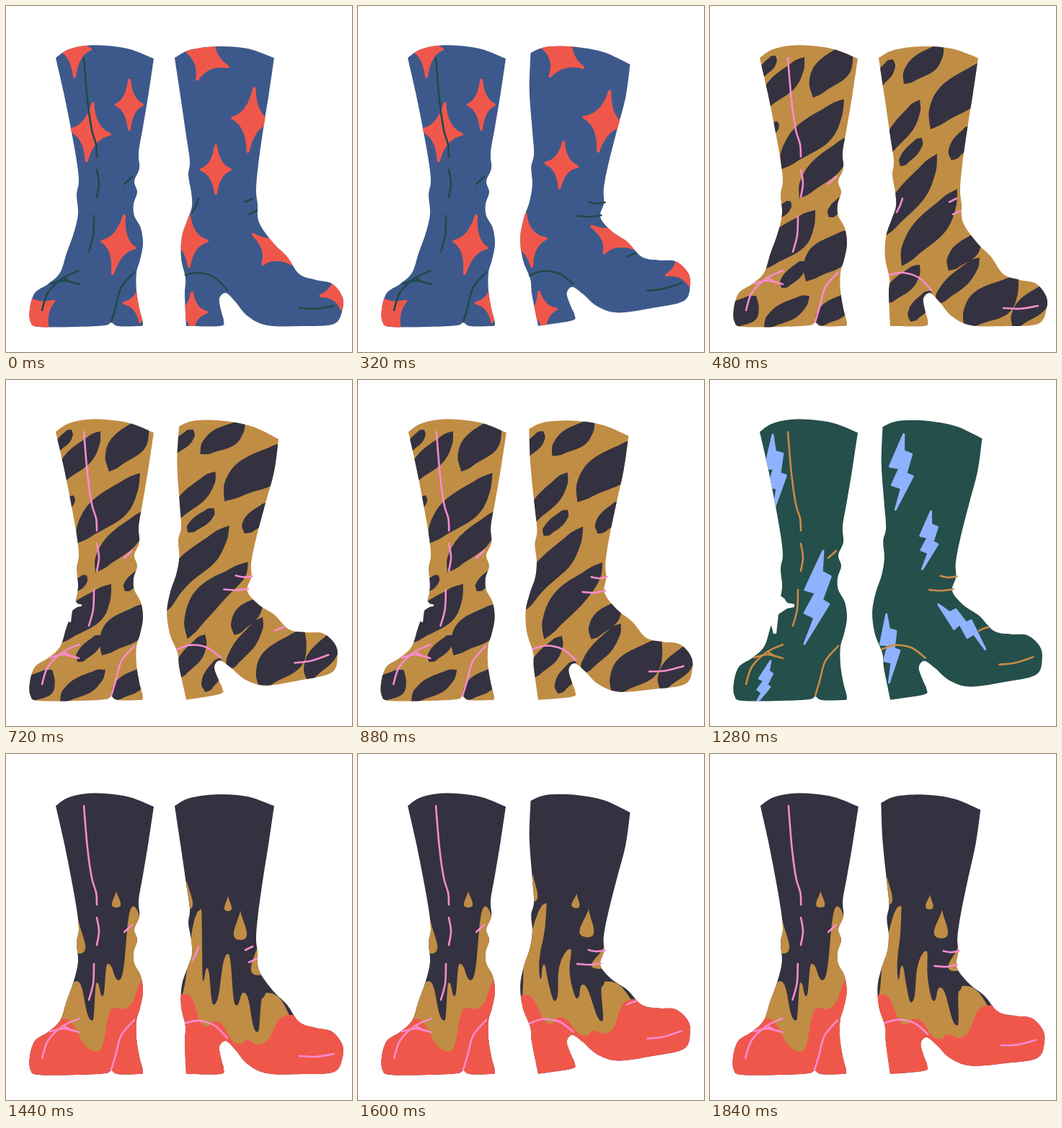
Write an HTML page with a canvas that moves like this. It is 480x480 px and loops after 1.92 s.

```html
<!DOCTYPE html>
<html lang="en">
<head>
<meta charset="utf-8">
<title>Boots</title>
<style>
  html, body { margin: 0; width: 100%; height: 100%; overflow: hidden; background: #fff; }
  canvas { display: block; width: 100vmin; height: 100vmin; }
</style>
</head>
<body>
<canvas></canvas>
<script>
const STEP = 80, FRAMES = 24, PER_LOOK = 6, UNITS = 480;
const POSES = [0, 0.6, 1, 1.1, 1, 0.6];
const RED = '#f0574b', BLUE = '#3d598b', OCHRE = '#c08d45', INK = '#343240',
      GREEN = '#254f4b', SKY = '#8fb2ff', PINK = '#f98bd0', ORANGE = '#cb8b45';

// "x,y x,y ..." to points; "|" separates lines
const points = s => s.trim().split(/\s+/).map(p => p.split(',').map(Number));
const lines = s => s.split('|').map(points);

const mix = (a, b, k) => a + (b - a) * k;
const ease = k => (k = Math.max(0, Math.min(1, k)), k * k * (3 - 2 * k));

// Outlines of the flat pose; a repeated point makes a corner
const OUTLINES = {
  left: points(`69,72 69,72 85,61 110,55 140,55 172,60 205,73 205,73 198,120 190,168 184,203 185,225
    178,243 182,258 177,275 178,291 187,308 190,330 186,352 181,370 181,395 185,420 190,441 183,444
    155,444 146,439 138,443 100,445 45,445 34,438 33,420 40,398 58,386 75,370 84,343 94,315 100,288
    98,262 101,243 98,215 90,170 80,120`),
  right: points(`234,72 234,72 255,61 295,56 335,59 372,72 372,72 365,120 357,170 350,220 347,255
    349,275 351,300 370,328 390,348 407,372 430,380 452,385 466,402 467,420 455,441 410,444 362,443
    335,430 318,410 305,398 296,406 299,425 302,437 297,444 250,444 250,444 248,400 249,378 243,350
    244,320 252,296 258,278 257,258 253,235 255,215 250,180 242,125`)
};

// The foot turns up about the heel, the shaft leans the other way, the ankle blends both
function tilt([x, y], t) {
  const a = 0.155 * t, dx = x - 248, dy = y - 443;
  const foot = [248 + dx * Math.cos(a) + dy * Math.sin(a), 443 - dx * Math.sin(a) + dy * Math.cos(a)];
  const u = (x - 303) / 68, drop = y - 72;
  const shaft = [x + t * (5.5 - 0.085 * drop + 6 * u * ease(drop / 60)), y + t * (1 + 8 * u - 0.04 * drop)];
  const k = ease((y - 250 - 0.25 * (x - 260)) / 65);
  return [mix(shaft[0], foot[0], k), mix(shaft[1], foot[1], k)];
}

function smooth(p, closed = true) {
  const path = new Path2D(), n = p.length;
  const at = i => closed ? p[(i + n) % n] : p[Math.max(0, Math.min(n - 1, i))];
  path.moveTo(...p[0]);
  for (let i = 0; i < (closed ? n : n - 1); i++) {
    const a = at(i - 1), b = at(i), c = at(i + 1), d = at(i + 2);
    if (b[0] === c[0] && b[1] === c[1]) continue;
    path.bezierCurveTo(b[0] + (c[0] - a[0]) / 6, b[1] + (c[1] - a[1]) / 6,
      c[0] - (d[0] - b[0]) / 6, c[1] - (d[1] - b[1]) / 6, ...c);
  }
  return path;
}

function polygon(p) {
  const path = new Path2D();
  p.forEach(q => path.lineTo(...q));
  path.closePath();
  return path;
}

// Samples a curve given by x(k), y(k) for k from 0 to 1
const sample = (n, f) => Array.from({ length: n + 1 }, (_, i) => f(i / n));

// Four tips joined by curves that sag toward the centre
function star(x, y, w, h, angle = 0) {
  const c = Math.cos(angle), s = Math.sin(angle);
  const turn = (a, b) => [x + a * c - b * s, y + a * s + b * c];
  const tips = [[0, -h], [w, 0], [0, h], [-w, 0]];
  return tips.flatMap(([ax, ay], i) => {
    const [bx, by] = tips[(i + 1) % 4];
    return sample(8, k => {
      const p = (1 - k) ** 2 + 0.35 * k * (1 - k), q = k * k + 0.35 * k * (1 - k);
      return turn(ax * p + bx * q, ay * p + by * q);
    });
  });
}

// Spindle whose two sides swell at different places
function stripe(x1, y1, x2, y2, w) {
  const len = Math.hypot(x2 - x1, y2 - y1), nx = (y1 - y2) / len, ny = (x2 - x1) / len;
  const end = Math.min(5, w / 2);
  const side = (sign, power) => sample(9, k => {
    const body = end + (w - end) * Math.sin(Math.PI * k ** power) ** 1.4;
    const half = sign * body * Math.min(1, Math.sqrt(10 * k * (1 - k)));
    return [mix(x1, x2, k) + nx * half, mix(y1, y2, k) + ny * half];
  });
  return [...side(1, 1.3), ...side(-1, 0.75).reverse()];
}

// Zigzag as distance along and across the line from top to tip
const ZIGZAG = points('0,0 .44,.106 .45,-.01 .68,.063 .71,-.05 1,0 .54,-.17 .51,-.09 .25,-.13 .22,-.03');
const bolt = (x1, y1, x2, y2) => ZIGZAG.map(([s, o]) =>
  [mix(x1, x2, s) - o * (y2 - y1), mix(y1, y2, s) + o * (x2 - x1)]);

function flameDrop(x, y, w, h) {
  const half = sign => sample(10, k => {
    const j = 1 - k;
    return [x - sign * w * (0.6 * j * j * k + 6.6 * j * k * k), y + h * (1.05 * j * j * k + 3 * j * k * k + k ** 3)];
  });
  return [...half(1), ...half(-1).reverse()];
}

// Peaks and valleys joined by swinging curves, filled down to the given floor
function wave(s, floor) {
  const p = points(s), out = [];
  for (let i = 0; i + 1 < p.length; i++) {
    const [ax, ay] = p[i], [bx, by] = p[i + 1];
    out.push(...sample(10, k => [mix(ax, bx, mix(k, 0.5 + 4 * (k - 0.5) ** 3, 0.35)), mix(ay, by, ease(k))]));
  }
  return [...out, [p[p.length - 1][0], floor], [p[0][0], floor]];
}

const each = (make, list) => list.map(a => make(...a));
const layer = (color, round, path, left, right) => ({ color, round, path, left, right });

const stars = layer(RED, 4, polygon,
  each(star, [[171, 137, 18, 34], [116, 175, 28, 40, 0.11], [95, 60, 22, 38], [156, 331, 23, 41, 0.2],
    [39, 428, 33, 44, -0.6], [186, 412, 22, 26]]),
  each(star, [[277, 72, 33, 32, 0.38], [340, 158, 26, 44, 0.1], [291, 227, 20, 33], [254, 326, 25, 35],
    [371, 338, 25, 35, -0.93], [461, 397, 25, 24, -0.2], [258, 425, 20, 27]]));

const stripes = layer(INK, 0, smooth,
  each(stripe, [[70, 98, 91, 69, 8], [70, 145, 131, 71, 17], [143, 127, 195, 50, 23], [84, 181, 93, 160, 6],
    [98, 227, 186, 129, 24], [124, 267, 196, 180, 19], [89, 296, 112, 271, 8], [165, 293, 191, 262, 9],
    [72, 366, 146, 283, 23], [99, 391, 132, 354, 10], [133, 382, 196, 310, 25], [25, 448, 64, 402, 21],
    [75, 446, 138, 402, 14], [148, 444, 196, 399, 16]]),
  each(stripe, [[231, 113, 254, 74, 10], [269, 108, 324, 53, 17], [306, 171, 386, 74, 27], [335, 214, 364, 165, 13],
    [243, 208, 291, 130, 14], [264, 222, 294, 183, 9], [240, 321, 315, 205, 19], [266, 361, 343, 254, 21],
    [331, 367, 376, 314, 16], [243, 413, 291, 359, 14], [278, 438, 306, 395, 12], [313, 414, 374, 349, 13],
    [353, 448, 428, 375, 27], [420, 447, 472, 384, 18]]));

const bolts = layer(SKY, 3, polygon,
  each(bolt, [[87, 76, 88, 181], [157, 237, 131, 366], [84, 390, 63, 450]]),
  each(bolt, [[264, 79, 265, 188], [310, 185, 306, 269], [263, 326, 252, 420], [336, 323, 391, 395]]));

const flames = layer(OCHRE, 0, polygon,
  [wave('66,375 98,315 120,370 126,317 134,336 141,291 157,314 176,211 200,270', 420),
    ...each(flameDrop, [[101, 232, 9, 45], [153, 190, 6, 23]])],
  [wave('236,345 271,215 273,315 279,297 288,348 308,277 319,349 330,331 349,386 356,338 362,331 420,385', 420),
    ...each(flameDrop, [[251, 176, 8, 40], [308, 197, 5, 21], [325, 217, 9, 41], [350, 262, 10, 45]])]);

const embers = layer(RED, 0, polygon,
  [wave('20,402 75,366 127,413 150,352 162,354 200,305', 460)],
  [wave('232,335 250,333 278,378 290,371 324,402 334,397 350,403 392,362 500,372', 460)]);

const LOOKS = [
  { base: BLUE, seam: '#1f4a48', layers: [stars] },
  { base: OCHRE, seam: PINK, layers: [stripes] },
  { base: GREEN, seam: ORANGE, layers: [bolts] },
  { base: INK, seam: PINK, layers: [flames, embers] }
];

const SEAMS = {
  left: lines(`108,72 113,130 119,172 125,192 126,209|126,227 129,246 126,265|122,291 121,318 115,341|
    164,247 175,237|50,422 58,398 78,378 101,367|61,385 80,381 101,386|81,378 90,383|
    178,369 160,390 152,418 146,438`),
  right: lines('249,373 268,370 290,377 307,394|407,419 430,420 455,416'),
  flat: lines('267,267 264,276 259,286|332,272 342,267|337,289 348,284'),
  bent: lines('330,276 340,277 350,274|322,299 337,300 351,296'),
  crease: lines('373,348 379,345 386,343')
};
const GASH = points('90,294 103,303 107,309 117,311 117,315 107,317 95,325 92,352 88,352 83,332 60,340 70,290');

const canvas = document.querySelector('canvas'), ctx = canvas.getContext('2d');

const strokeSeams = (set, place) => set.forEach(l => ctx.stroke(smooth(l.map(place), false)));

function drawBoot(side, look, place, gash = 0) {
  const body = smooth(OUTLINES[side].map(place));
  ctx.save();
  ctx.fillStyle = look.base;
  ctx.fill(body);
  ctx.clip(body);
  for (const l of look.layers) {
    ctx.fillStyle = ctx.strokeStyle = l.color;
    ctx.lineWidth = l.round;
    for (const s of l[side]) {
      const path = l.path(s.map(place));
      ctx.fill(path);
      if (l.round) ctx.stroke(path);
    }
  }
  ctx.restore();
  if (gash) {
    ctx.fillStyle = '#fff';
    ctx.fill(polygon(GASH.map(([x, y]) => [mix(87, x, gash), mix(312, y, gash)])));
  }
  ctx.strokeStyle = look.seam;
  ctx.lineWidth = 2.6;
  strokeSeams(SEAMS[side], place);
}

function draw(frame) {
  const look = LOOKS[Math.floor(frame / PER_LOOK)];
  const t = POSES[frame % PER_LOOK];
  const same = p => p, bend = p => tilt(p, t);
  const sway = ([x, y]) => [x - 0.005 * (y - 250), y];
  const scale = canvas.width / UNITS;
  ctx.setTransform(scale, 0, 0, scale, 0, 0);
  ctx.fillStyle = '#fff';
  ctx.fillRect(0, 0, UNITS, UNITS);
  ctx.lineCap = ctx.lineJoin = 'round';

  const gash = frame >= 12 && frame < 18 ? 1 : frame >= 9 && frame < 12 ? 0.6 : 0;
  drawBoot('left', look, t > 0 && t < 1 ? sway : same, gash);
  drawBoot('right', look, bend);
  strokeSeams(t ? SEAMS.bent : SEAMS.flat, bend);
  if (t >= 1) strokeSeams(SEAMS.crease, same);
}

let shown = -1;
function tick() {
  const size = Math.round(Math.min(innerWidth, innerHeight) * devicePixelRatio);
  const frame = Math.floor(performance.now() / STEP) % FRAMES;
  if (canvas.width !== size) {
    canvas.width = canvas.height = size;
    shown = -1;
  }
  if (frame !== shown) draw(shown = frame);
  requestAnimationFrame(tick);
}
tick();
</script>
</body>
</html>
```
